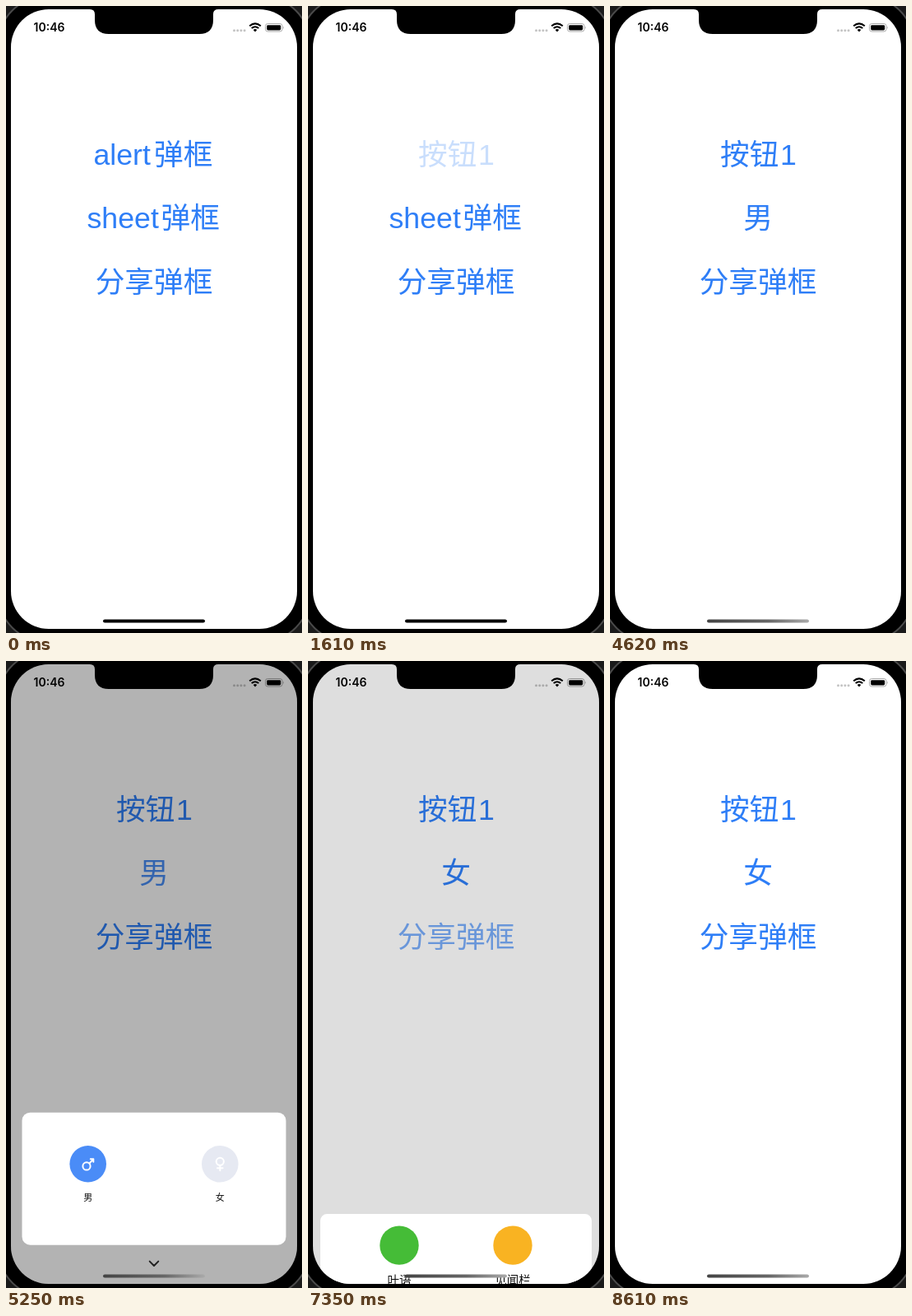
These frames come from a looping animation (360 by 762 pixels, 8680 ms). An HTML page:

```html
<!DOCTYPE html>
<html lang="zh-CN">
<head>
<meta charset="utf-8">
<title>弹框</title>
<style>
  html, body { margin: 0; height: 100%; overflow: hidden; background: #1a1a1a; }
  svg { display: block; width: 360px; height: 762px; }
  text { font-family: "Liberation Sans", "Noto Sans CJK SC", "Noto Sans CJK", sans-serif; }
  .title { font-size: 35.7px; fill: #2e7ef7; }
  .small { font-size: 11px; fill: #111; }
  .share { font-size: 14.5px; fill: #111; }
  .mid { text-anchor: middle; }
  .line { fill: none; stroke-width: 2; stroke-linecap: round; stroke-linejoin: round; }
  .clock { font: 600 14px Inter, sans-serif; }
</style>
</head>
<body>
<svg viewBox="0 0 360 762">
  <defs>
    <clipPath id="screen"><rect x="6" y="4" width="348" height="753" rx="46"/></clipPath>
    <linearGradient id="shine">
      <stop offset="0" stop-color="#444"/>
      <stop offset=".6" stop-color="#666"/>
      <stop offset="1" stop-color="#aaa"/>
    </linearGradient>
  </defs>

  <rect x="-10" y="-12" width="380" height="785" rx="60" stroke="#4a4a4a" stroke-width="2"/>

  <g clip-path="url(#screen)">
    <rect width="360" height="762" fill="#fff"/>
    <g id="first" class="title">
      <g id="alertTitle"><text x="106.5" y="193">alert</text><text x="180" y="193">弹框</text></g>
      <g id="choiceTitle"><text x="134" y="193">按钮</text><text x="207" y="193">1</text></g>
    </g>
    <g id="second" class="title">
      <g id="sheetTitle"><text x="98.5" y="270">sheet</text><text x="188.5" y="270">弹框</text></g>
      <text id="maleTitle" class="mid" x="180" y="270">男</text>
      <text id="femaleTitle" class="mid" x="180" y="270">女</text>
    </g>
    <text id="third" class="title mid" x="180" y="348">分享弹框</text>

    <g fill="#c4c4c4">
      <circle cx="277.5" cy="29.7" r="1.5"/><circle cx="281.7" cy="29.7" r="1.5"/>
      <circle cx="285.9" cy="29.7" r="1.5"/><circle cx="290.1" cy="29.7" r="1.5"/>
    </g>
    <rect x="315.5" y="21.5" width="20.5" height="9.5" rx="2.8" fill="none" stroke="#aaa"/>
    <path d="M337 24.5q1.6 1.7 0 3.4z" fill="#aaa"/>

    <rect id="dim" width="360" height="762"/>

    <text class="clock mid" x="52.5" y="31">10:46</text>
    <g fill="none" stroke="#000" stroke-width="2">
      <path d="M296.2 24.3q6.8-5.8 13.6 0M298.7 27q4.3-3.6 8.6 0"/>
    </g>
    <path d="M300.7 29q2.3-1.9 4.6 0l-2.3 2.4z"/>
    <rect x="317.2" y="23.2" width="17" height="6.2" rx="1.4"/>

    <g id="alert">
      <rect x="60" y="330" width="240" height="100" rx="12" fill="#fff"/>
      <text class="mid" x="180" y="363" font-size="15.2" font-weight="bold">提示</text>
      <path d="M60 390H300M180 390V430" stroke="#ddd"/>
      <g class="mid" font-size="15.2" fill="#2e7ef7">
        <text x="120" y="416">按钮1</text><text x="240" y="416">按钮2</text>
      </g>
    </g>

    <g id="sheet">
      <rect x="19.5" y="548" width="321" height="161" rx="10" fill="#fff"/>
      <circle id="male" cx="99.7" cy="610.6" r="22.3"/>
      <circle id="female" cx="260.3" cy="610.6" r="22.3"/>
      <g class="line" stroke="#fff">
        <circle cx="98" cy="613.3" r="4.6"/>
        <path d="M101.5 609.8L106 605M102.8 604.7H106.3V608.2"/>
        <circle cx="260.3" cy="607.7" r="4.6"/>
        <path d="M260.3 612.5V618.5M257 615.6H263.6"/>
      </g>
      <text class="small mid" x="99.7" y="655">男</text>
      <text class="small mid" x="260.3" y="655">女</text>
      <path class="line" d="M174.7 729L180 734.4L185.3 729" stroke="#222"/>
    </g>

    <g id="share">
      <rect x="15" y="563" width="330" height="107" rx="8" fill="#fff"/>
      <circle cx="111" cy="601" r="23.7" fill="#45bc37"/>
      <circle cx="249" cy="601" r="23.7" fill="#f9b322"/>
      <text class="share mid" x="111" y="649">叶语</text>
      <text class="share mid" x="249" y="649">见闻栏</text>
      <rect x="15" y="679" width="330" height="45" rx="8" fill="#fff"/>
      <text class="share mid" x="180" y="707">取消</text>
    </g>
    <rect id="home" x="118" y="745.4" width="124" height="4.2" rx="2.1"/>
  </g>
  <path d="M102 0V4Q108 4 108 10V17Q108 34 125 34H235Q252 34 252 17V10Q252 4 258 4V0Z"/>
</svg>

<script>
const LOOP = 8680, STEP = 70, DIM = 0.3;
const el = Object.fromEntries([...document.querySelectorAll('[id]')].map(e => [e.id, e]));

const ramp = (t, start, length) => Math.min(1, Math.max(0, (t - start) / length));
const ease = x => x ** 1.75 / (x ** 1.75 + (1 - x) ** 1.75);
const easeOut = x => 1 - (1 - x) ** 2;

// How far a popup is open, from 0 to 1
const shown = (t, open, close, closeLength = 280) =>
  ease(ramp(t, open, 280)) - ease(ramp(t, close, closeLength));

// A touched button drops to 20 % and recovers
const press = (t, down, release) =>
  t < down ? 1 : 0.2 + 0.8 * easeOut(ramp(t, release, 520));

const fadeOut = (t, start) => 1 - ramp(t, start, 280);
const fadeIn = (t, start) => ramp(t, start + 280, 280);

const opacity = (node, value) => node.setAttribute('opacity', value);
const slide = (node, distance) => node.setAttribute('transform', `translate(0 ${distance})`);

function draw(t) {
  const alert = shown(t, 280, 1260);
  const sheet = t < 4700 ? shown(t, 2390, 4410, 210) : shown(t, 4980, 6580);
  const share = shown(t, 7220, 8330);

  opacity(el.first, press(t, 210, 250));
  opacity(el.second, t < 4700 ? press(t, 2380, 2350) : press(t, 4900, 4940));
  opacity(el.third, press(t, 7210, 7180));

  opacity(el.alertTitle, fadeOut(t, 1260));
  opacity(el.choiceTitle, fadeIn(t, 1260));
  opacity(el.sheetTitle, fadeOut(t, 3500));
  opacity(el.maleTitle, fadeIn(t, 3500) * fadeOut(t, 5810));
  opacity(el.femaleTitle, fadeIn(t, 5810));

  opacity(el.dim, DIM * Math.max(alert, sheet, share));
  opacity(el.alert, alert);
  const scale = t < 1000 ? 1.15 - 0.15 * alert : 1;
  el.alert.setAttribute('transform', `translate(180 380) scale(${scale}) translate(-180 -380)`);
  slide(el.sheet, 209 * (1 - sheet));
  slide(el.share, 194 * (1 - share));

  el.male.setAttribute('fill', t >= 3500 && t < 5810 ? '#4a8cf7' : '#e6e9f2');
  el.female.setAttribute('fill', t >= 5810 ? '#f75565' : '#e6e9f2');
  el.home.setAttribute('fill', t >= 4480 ? 'url(#shine)' : '#000');
}

function frame() {
  draw(Math.floor(performance.now() % LOOP / STEP) * STEP);
  requestAnimationFrame(frame);
}
frame();
</script>
</body>
</html>
```
